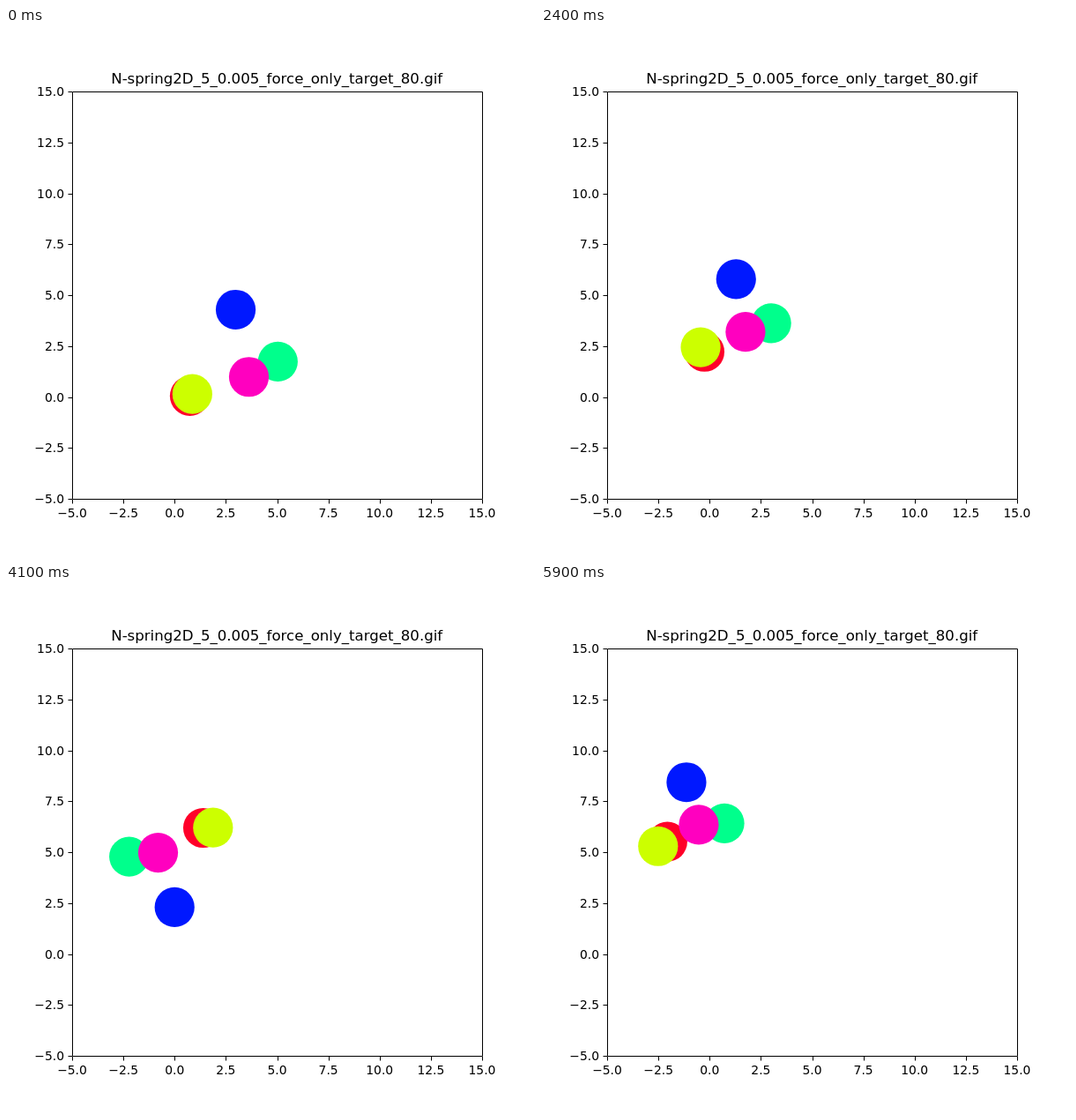
Animation of 600x600 px, one loop 6000 ms. Source, as an HTML page:

```html
<!DOCTYPE html>
<html lang="en">
<head>
<meta charset="utf-8">
<title>Spring simulation</title>
<style>
  html, body { margin: 0; width: 100%; height: 100%; overflow: hidden; background: #fff; }
  svg { display: block; width: 600px; height: 600px; }
  text { font-family: "DejaVu Sans", sans-serif; font-size: 13.89px; fill: #000; }
  .title { font-size: 16.6px; text-anchor: middle; }
  .x { text-anchor: middle; }
  .y { text-anchor: end; }
  .axes { fill: none; stroke: #000; stroke-width: 1; }
</style>
</head>
<body>
<svg viewBox="0 0 600 600">
  <g id="balls"></g>
  <path class="axes" id="axes"/>
  <g id="labels">
    <text class="title" x="307.2" y="63">N-spring2D_5_0.005_force_only_target_80.gif</text>
  </g>
</svg>
<script>
const LOOP = 6000, STEP = 100, RADIUS = 22.6;
const PERIOD = 1.158, PEAK = -0.03;

// Every ball swings about a drifting center. Its cosine and sine
// amplitudes change slowly, as polynomials in seconds.
const BALLS = [
  { fill: '#ff0029', x: { cos: [-44.5, 2.4], sin: [0] },
                     y: { cos: [33.5, 3, -0.82], sin: [-6, 2] } },
  { fill: '#ccff00', x: { cos: [-43, -3.2, 0.45], sin: [8.5, -1.2] },
                     y: { cos: [31, -0.2, 0.36], sin: [-4, -0.6] } },
  { fill: '#00ff8c', x: { cos: [58.3], sin: [-10, 1.8] },
                     y: { cos: [-6.7, 1], sin: [-1, 0.2] } },
  { fill: '#0018ff', x: { cos: [6.7, -3, 0.3], sin: [9.5, -1.6] },
                     y: { cos: [-66.6, 0.3], sin: [0] } },
  { fill: '#ff00bf', x: { cos: [25.3, -0.2], sin: [-11.5, 1] },
                     y: { cos: [8.8, -3.6, 0.38], sin: [11.5, -1.8] } }
];
const CENTER = { x: [252.4, -14.76], y: [385.2, -19.4] };

const poly = (coeffs, t) => coeffs.reduceRight((sum, c) => sum * t + c, 0);

function place(ball, axis, t) {
  const phase = (t - PEAK) / PERIOD * 2 * Math.PI;
  const { cos, sin } = ball[axis];
  return poly(CENTER[axis], t) +
    poly(cos, t) * Math.cos(phase) + poly(sin, t) * Math.sin(phase);
}

function add(parent, tag, attrs, text = '') {
  const el = document.createElementNS('http://www.w3.org/2000/svg', tag);
  for (const key in attrs) el.setAttribute(key, attrs[key]);
  el.textContent = text;
  return document.getElementById(parent).appendChild(el);
}

function drawAxes() {
  let d = 'M75.5 72.5H540.5V534.5H75.5Z';
  for (let i = 0; i <= 8; i++) {
    const x = 75 + i * 58.125, y = 534 - i * 57.75;
    const label = (i * 2.5 - 5).toFixed(1).replace('-', '\u2212');
    d += `M${Math.round(x) + 0.5} 535v4.5M75 ${Math.round(y) + 0.5}h-4.5`;
    add('labels', 'text', { class: 'x', x, y: 555 }, label);
    add('labels', 'text', { class: 'y', x: 66, y: Math.round(y + 5) }, label);
  }
  document.getElementById('axes').setAttribute('d', d);
}

const circles = BALLS.map(({ fill }) => add('balls', 'circle', { r: RADIUS, fill }));

function draw() {
  const t = Math.floor(performance.now() % LOOP / STEP) * STEP / 1000;
  circles.forEach((circle, i) => {
    circle.setAttribute('cx', place(BALLS[i], 'x', t).toFixed(2));
    circle.setAttribute('cy', place(BALLS[i], 'y', t).toFixed(2));
  });
  requestAnimationFrame(draw);
}

drawAxes();
draw();
</script>
</body>
</html>
```
